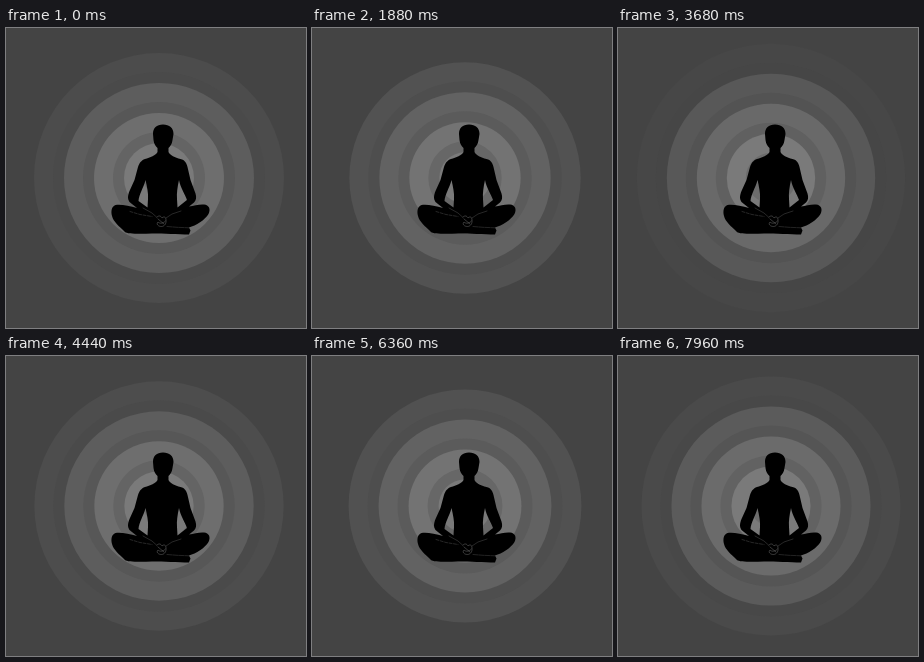
Recreate the animation shown at these times as an HTML page with a canvas. Size 300 by 300 pixels, loop 8000 ms.

```html
<!DOCTYPE html>
<html lang="en">
<head>
<meta charset="utf-8">
<title>Meditation</title>
<style>
  html, body { margin: 0; width: 100%; height: 100%; overflow: hidden; background: #444; }
  canvas, svg { position: absolute; left: 0; top: 0; width: 300px; height: 300px; }
</style>
</head>
<body>
<canvas id="waves" width="300" height="300"></canvas>
<svg viewBox="0 0 300 300">
  <g id="figure">
    <path d="M157 96.500C150.500 96.500 147 100 147 106L147.500 112C148 116 149.500 118 151.500 120L151.500 124
      C150 127.500 144 129.500 139 131C135 132.500 133.500 135 132 139L128.500 152L123.500 163
      C121.500 168 121.500 171 123.500 174L131 180C123 177.500 114 176 109.500 177C105.500 178.500 104.800 183 106 188
      C107.500 194 113 198 119 204C121 206 134 206 146 205.500C158 205.500 172 206.500 183 206.500L184.500 202.500L183 199.500
      C190 197.500 199 192 202.500 186C205 181 203 177 198 176.500C193 176 188 178 183 178.500
      L188 174.500C190.500 172 190.500 169 189.500 165.500L184.500 152L181.500 139C180.500 135 179 132 174.500 131
      C169 129.500 164 127.500 162.500 124L162.500 120C164.500 118 166 116 166.500 112L167.500 106C167.500 100 163.500 96.500 157 96.500Z"/>
    <path class="gap" d="M139.500 152C141 159 142.500 165 142 171L141.500 179.500L132.500 173C133 166 137.500 160 139.500 152Z"/>
    <path class="gap" d="M173 152C174.500 160 179 166 181 172L171.500 179.500L171 171C170.500 165 171.500 159 173 152Z"/>
  </g>
  <g fill="none" stroke="#777" stroke-width=".6" stroke-linecap="round">
    <path d="M124 183.500L134 186.500L146 188.500" stroke-dasharray="3 1.500" opacity=".55"/>
    <path d="M137 180L146 185L151 189.500M175 183L166 186L160 190" opacity=".55"/>
    <path d="M151 189C153 187 155 188 156 190C158 188 160 189 160 192C160.500 196 158 198.500 155.500 198.500
      C152 198.500 150 196 152 194C154 196 157 195.500 159.500 193M152 191L158 196" opacity=".8"/>
    <path d="M161 198.500L171 199.300L183 199.800" stroke-dasharray="5 1" opacity=".5"/>
  </g>
</svg>
<script>
const LOOP = 8000, STEP = 40, PERIOD = 1113;
const SPACING = 30, BAND = 19, START = 5, REACH = 140;
const BACKGROUND = 68, GAIN = 0.56, MAX_GLOW = 54, TROUGH = 0.75;
const CENTER = { x: 153, y: 150 };
const ctx = document.getElementById('waves').getContext('2d');

// Gaps take the shape of the path but show the waves behind it.
const [outline, ...gaps] = document.querySelectorAll('#figure path');
outline.setAttribute('fill-rule', 'evenodd');
for (const gap of gaps) {
  outline.setAttribute('d', outline.getAttribute('d') + gap.getAttribute('d'));
  gap.remove();
}

function disc(r, glow) {
  if (r <= 0) return;
  const v = Math.round(BACKGROUND + glow);
  ctx.fillStyle = `rgb(${v},${v},${v})`;
  ctx.beginPath();
  ctx.arc(CENTER.x, CENTER.y, r, 0, Math.PI * 2);
  ctx.fill();
}

// Each wave is a bright band with a dimmer trough inside; both fade as it grows.
function drawWave(r) {
  const glow = Math.min(MAX_GLOW, Math.max(0, GAIN * (REACH - r)));
  disc(r, glow);
  disc(r - BAND, glow * TROUGH);
}

function draw(time) {
  ctx.fillStyle = `rgb(${BACKGROUND},${BACKGROUND},${BACKGROUND})`;
  ctx.fillRect(0, 0, 300, 300);
  const phase = (START + SPACING * time / PERIOD) % SPACING;
  for (let r = phase + SPACING * 4; r > 0; r -= SPACING) {
    if (r < REACH) drawWave(r);
  }
}

const begin = performance.now();
function tick() {
  const time = (performance.now() - begin) % LOOP;
  draw(Math.floor(time / STEP) * STEP);
  requestAnimationFrame(tick);
}
tick();
</script>
</body>
</html>
```
